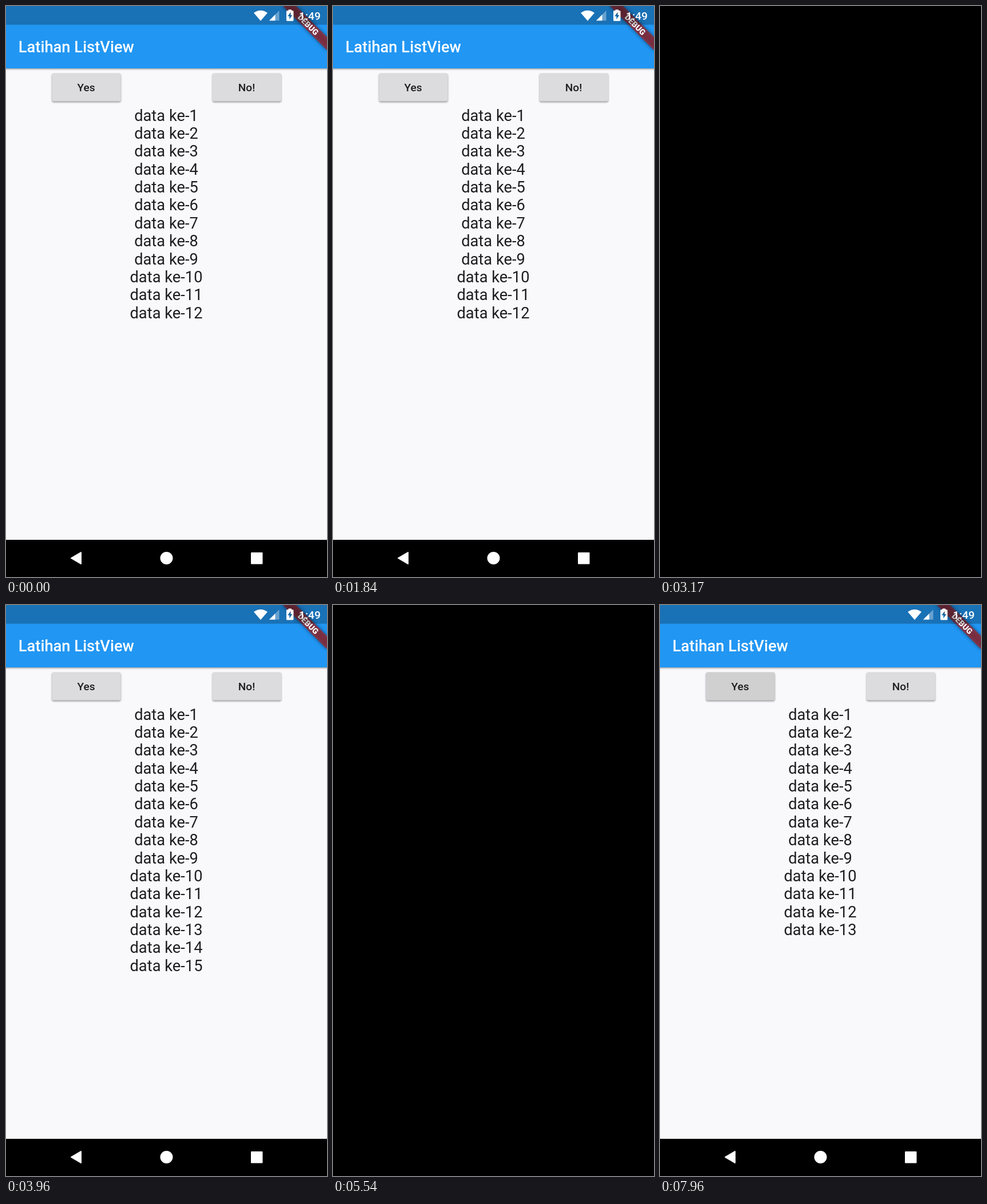
Recreate the animation shown at these times as an HTML page. Size 561x998 px, loop 8000 ms.

```html
<!DOCTYPE html>
<html lang="id">
<head>
<meta charset="utf-8">
<title>Latihan ListView</title>
<style>
html, body { margin: 0; width: 100%; height: 100%; overflow: hidden; background: #000; }
svg { display: block; width: 561px; height: 998px; font-family: Roboto, sans-serif; }
.mid { text-anchor: middle; }
.label { font-size: 19.1px; font-weight: 500; fill: #1e1e1e; }
.list { font-size: 27.3px; fill: #1e1e20; }
</style>
</head>
<body>
<svg viewBox="0 0 561 998">
  <defs>
    <filter id="soft" x="-20%" y="-60%" width="140%" height="220%"><feGaussianBlur stdDeviation="1.7"/></filter>
    <filter id="glow" x="-30%" y="-100%" width="160%" height="300%"><feGaussianBlur stdDeviation="3"/></filter>
    <clipPath id="clipYes"><rect x="80.5" y="117.5" width="120" height="49" rx="2.7"/></clipPath>
    <clipPath id="clipNo"><rect x="361" y="117.5" width="120" height="49" rx="2.7"/></clipPath>
  </defs>

  <rect width="561" height="934" fill="#f9f9fc"/>
  <g id="buttons"></g>
  <g id="list" class="list mid"></g>

  <rect x="-9" y="90" width="579" height="20.5" opacity=".38" filter="url(#soft)"/>
  <rect width="561" height="109" fill="#2196f3"/>
  <text x="21.8" y="81" font-size="27.3" font-weight="500" fill="#fff">Latihan ListView</text>

  <g transform="translate(561 0) rotate(45)">
    <rect x="-54.5" y="38.2" width="109" height="16.4" opacity=".5" filter="url(#glow)"/>
    <rect x="-54.5" y="38.2" width="109" height="16.4" fill="#b71c1c" opacity=".63"/>
    <text class="mid" y="51.3" font-size="13.9" font-weight="900" fill="#fff">DEBUG</text>
  </g>

  <rect width="561" height="32.7" opacity=".25"/>
  <g fill="#fff">
    <path d="M433 12Q445 3.5 457 12L445 26Z"/>
    <path d="M460 25.5L477.500 8V25.500Z" opacity=".35"/>
    <path d="M460 25.500L470.500 15V25.500Z"/>
    <path fill-rule="evenodd" d="M493.500 8V6.200H499V8H501Q502.500 8 502.500 9.500V24.700Q502.500 26.200 501 26.200H491.500Q490 26.200 490 24.700V9.500Q490 8 491.500 8ZM497.500 10.500L492.300 18H495.300V23.500L500.300 16H497.500Z"/>
    <text x="512" y="24" font-size="19.2" font-weight="500">1:49</text>
  </g>

  <rect y="933" width="561" height="65"/>
  <g fill="#fff" stroke="#fff" stroke-linejoin="round">
    <path d="M114 965L131 955V975Z" stroke-width="2"/>
    <circle cx="280.500" cy="965" r="11" stroke="none"/>
    <rect x="429" y="956" width="18.500" height="18.500" stroke-width="2"/>
  </g>
  <rect id="black" width="561" height="998" visibility="hidden"/>
</svg>
<script>
const LOOP = 8000;
const NS = 'http://www.w3.org/2000/svg';
const $ = id => document.getElementById(id);
const clamp = x => Math.min(1, Math.max(0, x));

// Spans in which the whole screen is black
const blanks = [[500, 1630], [2340, 2590], [3170, 3420], [4000, 4750],
                [5540, 5790], [6250, 6710], [7090, 7840]];
// Tap time, button, number of rows after it
const taps = [[1860, 'Yes', 13], [2590, 'Yes', 14], [3420, 'Yes', 15],
              [4970, 'No', 14], [5790, 'No', 13], [6710, 'No', 12], [7840, 'Yes', 13]];

function add(parent, tag, attrs, text) {
  const el = document.createElementNS(NS, tag);
  for (const key in attrs) el.setAttribute(key, attrs[key]);
  if (text) el.textContent = text;
  return parent.appendChild(el);
}

function makeButton(id, label, x, touchX) {
  const box = { x, y: 117.5, width: 120, height: 49, rx: 2.7 };
  const g = $('buttons');
  add(g, 'rect', { ...box, y: 119.2, opacity: .4, filter: 'url(#soft)' });
  add(g, 'rect', { ...box, fill: '#dcdcde' });
  const shade = add(g, 'rect', { ...box, fill: '#bcbcb8', opacity: 0 });
  const clip = add(g, 'g', { 'clip-path': `url(#clip${id})` });
  const ripple = add(clip, 'circle', { cx: touchX, cy: 144, r: 0, fill: '#b4b4b4', opacity: 0 });
  add(g, 'text', { x: x + 59.5, y: 148.8, class: 'label mid' }, label);
  return { shade, ripple };
}

const buttons = {
  Yes: makeButton('Yes', 'Yes', 80.5, 110),
  No: makeButton('No', 'No!', 361, 471)
};
const rows = Array.from({ length: 15 }, (_, i) =>
  add($('list'), 'text', { x: 280, y: 200.6 + 31.37 * i }, `data ke-${i + 1}`));

function press({ shade, ripple }, age) {
  const fade = age < 0 ? 0 : 1 - clamp((age - 180) / 220);
  const grow = clamp((age - 10) / 105);
  shade.setAttribute('opacity', .25 * fade * clamp((age + 60) / 120));
  ripple.setAttribute('r', 2 + 122 * grow);
  ripple.setAttribute('opacity', fade * (.14 + .66 * (1 - clamp(age / 50))));
}

function draw(t) {
  let count = 12;
  const age = { Yes: -1, No: -1 };
  for (const [at, id, after] of taps) {
    if (t >= at) age[id] = t - at;
    if (t >= at + 90) count = after;
  }
  for (const id in buttons) press(buttons[id], age[id]);
  rows.forEach((row, i) => row.setAttribute('visibility', i < count ? 'visible' : 'hidden'));
  const dark = blanks.some(([from, to]) => t >= from && t < to);
  $('black').setAttribute('visibility', dark ? 'visible' : 'hidden');
}

const start = performance.now();
function tick() {
  draw((performance.now() - start) % LOOP);
  requestAnimationFrame(tick);
}
tick();
</script>
</body>
</html>
```
